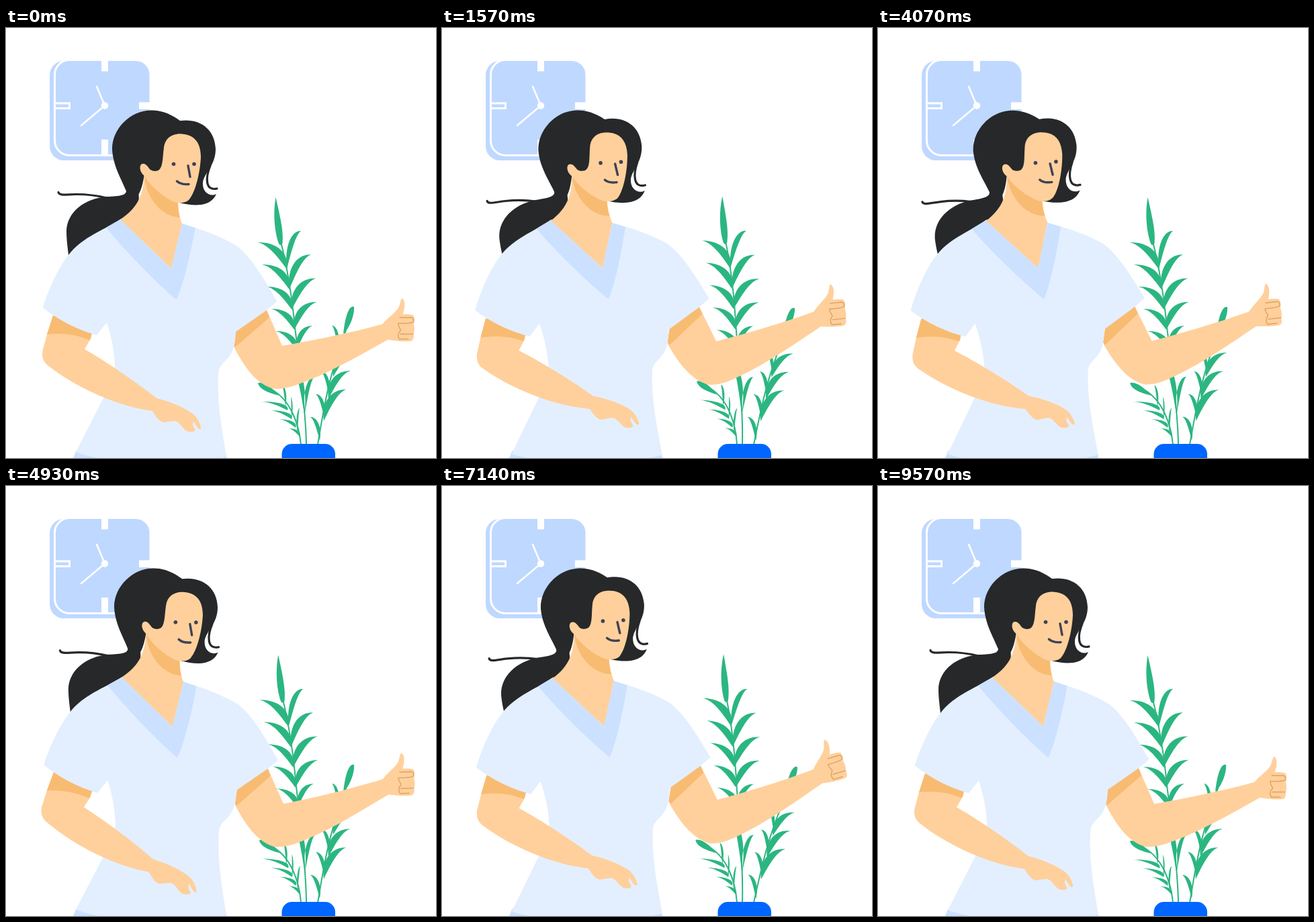
An HTML page for the animation above (9.64 s loop, 640 by 640 pixels).

```html
<!DOCTYPE html>
<html lang="en">
<head>
<meta charset="utf-8">
<title>Thumbs up</title>
<style>
  html, body { margin: 0; width: 100%; height: 100%; overflow: hidden; background: #fff; }
  svg { display: block; width: 100vw; height: 100vh; }
  .line { fill: none; stroke-linecap: round; stroke-linejoin: round; }
  .skin { fill: #ffd09c; }
  .shade { fill: #f8bb72; }
  .shirt { fill: #e3effe; }
  .trim { fill: #cbe1ff; }
  .hair { fill: #26282a; }
  .ink { stroke: #3d4257; stroke-width: 3.4; }
  .strand { stroke: #26282a; stroke-width: 3.2; }
  .plant { fill: #2bb681; }
  .plant .line { stroke: #2bb681; stroke-width: 2; }
</style>
</head>
<body>
<svg viewBox="0 0 640 640">
  <g id="clock" fill="#bfd8ff">
    <rect x="65" y="49" width="140" height="148" rx="21"/>
    <rect x="72.500" y="47.500" width="142.500" height="142" rx="22" stroke="#fff" stroke-width="3"/>
    <path fill="#fff" d="M142 48h10v16.500h-10zM142 166h10v23h-10zM198 110.500h17v10.500h-17z"/>
    <path fill="none" stroke="#fff" stroke-width="3" d="M73 112h21.500v7.500h-21.500"/>
    <path class="line" stroke="#fff" stroke-width="2.600" d="M135 87L147 115.500L112 145"/>
    <circle cx="147" cy="115.500" r="5.200" fill="#fff"/>
  </g>

  <g class="plant" id="stemL">
    <path class="line" d="M439 620C436 590 424 555 397 539"/>
    <path d="M375 528.500C382 526 395 533 406 547C396 544 378 540 375 528.500Z"/>
  </g>
  <g class="plant" id="stemR">
    <path class="line" d="M464 620C474 560 480 520 506 450"/>
    <path d="M517 414.500C509 414 504 435 502 455C510 449 519 428 518 415.500Z"/>
  </g>
  <g class="plant" id="stemM">
    <path class="line" d="M447 620C446 560 434 480 430 445C425 395 417 350 409 318"/>
    <path d="M401.500 252C397 277 400 305 406 321C408 324 411 324 411.500 320C413 303 409 285 401.500 252Z"/>
  </g>
  <rect x="410.500" y="619" width="79.500" height="50" rx="15" fill="#06f"/>

  <path class="trim" d="M104.500 629L100 640H328L327 633Z"/>
  <g id="torso">
    <g id="armR">
      <path class="skin" d="M342 452L345 430L380 405L388 420L411 473L420 510L400 537L395 536C370 528 352 500 339 474Z"/>
      <path class="shade" d="M342 452L345 430L380 405L388 420L392 431L341 475L338 471Z"/>
      <g id="forearm">
        <path class="skin" d="M411 473C460 465 520 452 563 440L570 463C530 485 480 515 430 532C415 537 404 538 395 536C380 520 385 490 411 473Z"/>
        <g id="hand">
          <path class="skin" d="M560 441C570 429 583 422 585.500 413C587 408 587.500 404 589.500 402.500C595 406 594 416 590.500 426C596 426 604 426 606.500 428C609 432 608 438 607 441C608.500 447 608 453 606.500 456C607.500 461 606 465 603 466C590 467.500 577 465 566 463.500Z"/>
          <path class="line" stroke="#dda263" stroke-width="1.400" d="M586 431H603Q608 432 606 437.500Q604 440 584 439.500C583 446 588.500 447 587 450.500C583 454 583 460 585.500 463H599M587 455.500H606"/>
        </g>
      </g>
    </g>

    <g id="head">
      <g id="tail">
        <path class="line strand" d="M78 244.500C79 250 90 247.500 105 247.500C125 247.500 136 249.500 150 253"/>
        <path class="hair" d="M179 240C180 249 172 250 150 251C115 254 91 275 90 302C90 316 92 328 93 338L99 339C125 328 155 306 185 284C200 270 202 240 190 232Z"/>
      </g>
      <path class="hair" d="M259 138C243 126 228 122 215 122.500C185 123 158 150 158 180C159 205 172 225 179 243C183 262 200 262 206 217L258 260C285 267 306 264 313 247C303 252 292 244 293 230C295 215 312 205 312 180C311 150 288 134 259 138Z"/>
      <path class="line strand" d="M304 205C297 222 296 243 314 239"/>
      <path class="skin" d="M206 215C205 250 195 268 170 285L200 298L262 293C258 280 256 268 256 256Z"/>
      <path class="shade" d="M206 216C206 250 230 281 258.500 282C256.500 274 256 268 256 258Z"/>
      <path class="skin" d="M235 178C237 162 249 157.500 259 157.500C280 158 290 170 290 192C289 215 282 245 272 256C266 261.500 254 261 248 258C228 248 212 231 206 220C198 214 198 203 203 202C209 201 211 207 215 211C219 213.500 225 213.500 228 211C234 205 233 192 235 178Z"/>
      <g id="eyes" fill="#3d4257">
        <circle cx="249.500" cy="202.500" r="2.800"/>
        <circle cx="280" cy="202.500" r="2.800"/>
      </g>
      <path class="line ink" d="M271 205L274 221.500M254.500 228Q260 233.500 272 232.500"/>
    </g>

    <path class="skin" d="M163 290L171 284L215 283L262 290L246 362Z"/>
    <path class="shirt" d="M149 297C120 312 105 322 93 338C78 357 63 390 55 416C78 435 108 450 135 457L150 438C157 460 161 480 162 502C162 520 152 540 146 549L104 631C150 650 270 655 328 638C320 590 314 555 316 515C317 492 341 500 342 452L388 420L403.500 407C385 375 365 340 343 324C325 313 300 303 281 297L262 291L246 358L170 285Z"/>
    <path class="trim" d="M149 297L170 285L246 358.500L262 291L281.500 297.500C276 330 265 380 253.500 404.500C225 380 180 335 149 297Z"/>

    <g id="armL">
      <path class="skin" d="M70 428L61 456L54.500 480C52 495 60 501 66 505C105 535 165 563 218 570C223 578 228 586 235 587C243 586 252 583 256 587C262 592 266 600 271 600.500C277 602 283 600 281 597C278 593 277 588 279 585C283 592 287 600 290.500 596C289 588 284 577 275 572C265 565 245 556 224 551C195 528 150 497 117 478L127 461L125 440Z"/>
      <path class="shade" d="M70 428L61 456Q95 452 124.500 464.500L130 450L110 430Z"/>
    </g>
    <path class="shirt" d="M93 338C78 357 63 390 55 416C78 435 108 450 135 457L150 438L150 330Z"/>
  </g>
</svg>
<script>
const LOOP = 9640;
const $ = id => document.getElementById(id);

// Crescent from its base up and outwards to its tip
function leaf(bx, by, tx, ty) {
  const at = (u, v) => `${bx + u * (tx - bx)} ${by + v * (ty - by)}`;
  const belly = `${bx - 4 * Math.sign(tx - bx)} ${by + 0.62 * (ty - by)}`;
  return `M${at(0, 0)}C${belly} ${at(0.35, 1.02)} ${at(1, 1)}C${at(0.62, 0.93)} ${at(0.27, 0.4)} ${at(0, 0)}Z`;
}

// n leaves along one side of a stem
function fan(id, n, base, tip) {
  const path = document.createElementNS("http://www.w3.org/2000/svg", "path");
  path.setAttribute("d", Array.from({ length: n }, (_, i) => leaf(...base(i), ...tip(i))).join(""));
  $(id).append(path);
}

const mainBase = i => [418 + 3.7 * i, 359 + 30 * i];
fan("stemM", 5, mainBase, i => [374 + 6.7 * i, 319 + 33 * i]);
fan("stemM", 5, mainBase, i => [463 - 3.5 * (i - 2.6) ** 2, 302 + 35.3 * i]);
fan("stemM", 2, () => [444.5, 576], i => [425 + 34 * i, 500 + 19 * i]);
fan("stemR", 5, i => [495 - 7 * i, 480 + 33.5 * i], i => [485 - 8 * i, 443 + 34 * i]);
fan("stemR", 4, i => [494 - 7 * i, 486 + 33 * i], i => [524 - 5.8 * i, 455 + 27.7 * i]);
fan("stemL", 4, i => [419 + 6 * i, 569 + 13 * i], i => [380.5 + 13.3 * i, 556 + 13.3 * i]);
fan("stemL", 3, i => [416 + 9 * i, 564 + 19 * i], i => [411 + 13 * i, 532 + 17 * i]);

const ease = u => (1 - Math.cos(Math.PI * u)) / 2;
const bump = (t, mid, half) => ease(Math.max(0, 1 - Math.abs(t - mid) / half));

// The body rocks from hi to lo on these beats and ends at rest
const beats = [0, 700, 1750, 2970, 4120, 5300, 6500, 8000];

function rock(t, hi, lo, tempo = 1) {
  const s = t * tempo, last = beats.length - 1;
  const i = beats.findIndex(b => b > s);
  if (i < 0) return 0;
  const value = k => k % last === 0 ? 0 : k % 2 ? hi : lo;
  const u = (s - beats[i - 1]) / (beats[i] - beats[i - 1]);
  return value(i - 1) + (value(i) - value(i - 1)) * ease(u);
}

function turn(id, x, y, milliradians) {
  $(id).setAttribute("transform", `rotate(${milliradians * 0.18 / Math.PI} ${x} ${y})`);
}

function draw(now) {
  const t = now % LOOP;

  turn("torso", 215, 640, rock(t, 16, -28));
  turn("head", 215, 292, rock(t, 26, -35, 0.97));
  turn("tail", 175, 250, rock(t, 35, -70, 0.96));
  turn("armL", 100, 420, rock(t, 40, -26, 1.05));

  const reach = rock(t, 46, -78, 0.93);
  turn("armR", 350, 400, 0.4 * reach);
  turn("forearm", 400, 505, 0.6 * reach);
  turn("hand", 565, 452, -60 * bump(t, 2900, 2500) - 200 * bump(t, 7100, 1400));

  turn("stemM", 447, 620, 49 * (bump(t, 2050, 2050) + bump(t, 6870, 2770)));
  turn("stemR", 464, 620, 47 * bump(t, 2400, 2400) + 54 * bump(t, 7200, 2400));
  turn("stemL", 438, 620, 45 * (bump(t, 1750, 1750) + bump(t, 6100, 2200)));

  const open = 1 - 0.7 * bump(t % 2895, 0, 140) - 0.7 * bump(t % 2895, 2895, 140) * (t < 8685);
  const lid = t < 1000 ? 1 : open;
  $("eyes").setAttribute("transform", `translate(0 ${202.5 * (1 - lid)}) scale(1 ${lid})`);
  requestAnimationFrame(draw);
}
draw(0);
</script>
</body>
</html>
```
